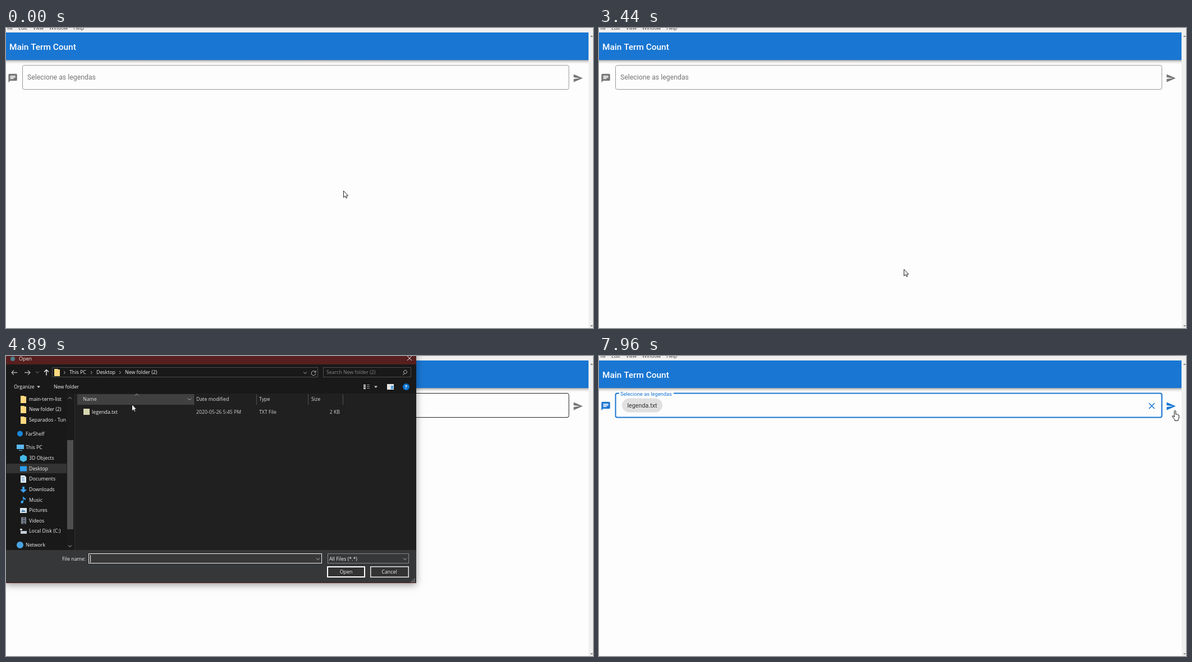
Animation of 1046x535 px, one loop 8 s. Source, as an HTML page with a canvas:

```html
<!DOCTYPE html>
<html>
<head>
<meta charset="utf-8">
<style>
html, body { margin: 0; width: 100%; height: 100%; overflow: hidden; background: #fdfdfd; }
canvas { display: block; }
</style>
</head>
<body>
<canvas id="stage" width="1046" height="535"></canvas>
<script>
const LOOP = 8000;
const stage = document.getElementById('stage').getContext('2d');
const dialog = document.createElement('canvas');
dialog.width = 732; dialog.height = 419;
const panel = dialog.getContext('2d');
let g = stage;

const UI = '"Open Sans", "Noto Sans", sans-serif';
const APP = 'Roboto, sans-serif';
const BLUE = '#1976d2';

// ---- drawing helpers
function rect(x, y, w, h, color) { g.fillStyle = color; g.fillRect(x, y, w, h); }
function frame(x, y, w, h, color, line = 1) {
  g.strokeStyle = color; g.lineWidth = line;
  g.strokeRect(x + line / 2, y + line / 2, w - line, h - line);
}
// y is the middle of the capitals
function text(str, x, y, color, size = 8.8, align = 'left', family = UI, weight = 400) {
  g.font = `${weight} ${size}px ${family}`;
  g.textAlign = align;
  g.fillStyle = color;
  g.fillText(str, x, y + size * 0.36);
}
function shape(d, x, y, color, scale = 1, rule = 'nonzero') {
  g.save(); g.translate(x, y); g.scale(scale, scale);
  g.fillStyle = color; g.fill(new Path2D(d), rule);
  g.restore();
}
function line(d, x, y, color, width = 1, fill) {
  g.save(); g.translate(x, y);
  const p = new Path2D(d);
  if (fill) { g.fillStyle = fill; g.fill(p); }
  g.strokeStyle = color; g.lineWidth = width; g.stroke(p);
  g.restore();
}
const chevron = (x, y, color = '#bbb') => line('M-3-1.5L0 1.5L3-1.5', x, y, color);
const clamp = v => Math.max(0, Math.min(1, v));

// ---- web page
const COMMENT = 'M20 2H4A2 2 0 0 0 2 4V22L6 18H20A2 2 0 0 0 22 16V4A2 2 0 0 0 20 2M6 9H18V11H6M14 14H6V12H14M18 8H6V6H18Z';
const SEND = 'M2 21L23 12L2 3V10L17 12L2 14Z';

function drawApp(t) {
  const focused = t >= 6970, hover = t >= 4120 && !focused;
  const tint = focused ? BLUE : '#757575';
  rect(0, 0, 1046, 535, '#fdfdfd');
  const shade = g.createLinearGradient(0, 57, 0, 64);
  shade.addColorStop(0, 'rgba(0,0,0,.38)');
  shade.addColorStop(0.4, 'rgba(0,0,0,.13)');
  shade.addColorStop(1, 'rgba(0,0,0,0)');
  rect(0, 57, 1038, 7, shade);
  rect(0, 8, 1038, 49, BLUE);
  rect(0, 0, 1046, 8, '#f0f0f0');
  rect(1038, 8, 8, 527, '#f0f0f0');
  shape('M0 3L2.5 0L5 3Z', 1041, 13, '#888');
  shape('M0 0L2.5 3L5 0Z', 1041, 530, '#888');
  [['File', -2], ['Edit', 22], ['View', 48], ['Window', 77], ['Help', 120]]
    .forEach(([s, x]) => text(s, x, 0, '#333', 8.8));
  text('Main Term Count', 6, 33, '#fff', 15.4, 'left', APP, 500);

  g.beginPath();
  g.roundRect(29.5, 66.5, 973.5, 43, 3);
  g.strokeStyle = focused ? BLUE : hover ? '#222' : '#989898';
  g.lineWidth = focused ? 2 : 1;
  g.stroke();
  const up = 1 - (1 - clamp((t - 6970) / 250)) ** 3;
  const rise = focused ? up : 0;
  if (focused) rect(36, 65, 97 * rise, 4, '#fdfdfd');
  text('Selecione as legendas', 38, 88 - 20.5 * rise, focused ? BLUE : '#757575', 12.3 - 3.05 * rise, 'left', APP);
  shape(COMMENT, 2.8, 80.3, tint, 0.768, 'evenodd');
  shape(SEND, 1010, 80.3, tint, 0.768);
  if (focused) {
    g.beginPath(); g.roundRect(41, 75.5, 72, 25, 12.5);
    g.fillStyle = '#e0e0e0'; g.fill();
    text('legenda.txt', 50.5, 88, '#333', 10.75, 'left', APP);
    line('M-5-5L5 5M5-5L-5 5', 985, 89, BLUE, 1.6);
  }
}

// ---- text editor
const LETTER = [
  '1|Dear Mirel,', '2|',
  '3|Thanks for your letter. I‘m glad you and the family are well. So, you‘re thinking of going on holiday in the UK.',
  '|Well I can certainly recommend one destination for you. I went one year to a place called Dunravoch in the north',
  '|west of Scotland. It‘s quite a long trip to get there as it‘s only about thirty miles from the north coast but it‘s',
  '|worth it.', '4|',
  '5|There are only a few places to stay. There are two hotels, the Fennoch and the Torlay in the centre of town, and a',
  '|campsite just outside town. We stayed at the Fennoch Hotel but I know you and your family are keen campers so you',
  '|might prefer the camping option.', '6|',
  '7|There is a lot to do but it‘s a bit dependent on the weather. There‘s a beautiful beach, a golf course, the fishing',
  '|is excellent and there are fantastic hills nearby for walking in amazing scenery. If it‘s wet there‘s a small cinema',
  '|in town but that‘s about all. Take some board games!', '8|',
  '9|The food is typical British in the hotels but some of the Scottish specialities are fantastic. If you‘re camping',
  '|though, food will be up to you!', '10|',
  '11|Anyway, I‘ve got to go out now and pick up the kids. Write again if you need any more information.', '12|',
  '13|Regards,', '14|'
].map(s => s.split('|'));

const MENU = [['File', -3], ['Edit', 24], ['Search', 50], ['View', 88], ['Encoding', 118], ['Language', 168], ['Settings', 219],
  ['Tools', 263], ['Macro', 294], ['Run', 332], ['Plugins', 358], ['Window', 400], ['?', 443]];
const TOOLS = [[4, '#8b8'], [21, '#fc5', 'f'], [39, '#58c', 'f'], [57, '#58c', 'f'], [75, '#c76'], [93, '#c76'], [111, '#79a', 'f'],
  [134, '#555', '✂'], [152, '#88a'], [170, '#b95'], [194, '#888', '↶'], [212, '#888', '↷'], [236, '#334', '∞'], [253, '#37a', 'ab'],
  [278, '#4a8', '○'], [295, '#c66', '○'], [320, '#fb5'], [337, '#fb5'], [361, '#37c', '↵'], [379, '#38d', '¶'], [398, '#24c', '≡'],
  [415, '#c85'], [433, '#e94', 'f'], [450, '#c95', 'ƒ'], [468, '#db5'], [486, '#665', '◉'], [510, '#911', '●'], [528, '#444', '■'],
  [545, '#48c', '▸'], [563, '#38d', '»'], [581, '#888', 'f']];
const TABS = [['new 1', 10], ['new 2', 64], ['new 3', 117], ['new 6', 171], ['new 9', 224], ['new 15', 277], ['new 17', 335],
  ['new 8', 394], ['new 12', 447], ['legenda.txt', 504]];

function drawEditor(t) {
  const clicked = t >= 1590;
  rect(0, 0, 1046, 535, '#f0f0f0');
  rect(0, 0, 1046, 7, '#fff');
  rect(0, 7, 1046, 20, '#f8f8f8');
  MENU.forEach(([s, x]) => text(s, x, 0, '#111', 8.6));
  text('x', 1041, 0, '#444', 8.6);

  [123, 183, 224, 266, 308, 350, 389, 499].forEach(x => rect(x, 9, 1, 14, '#ccc'));
  [361, 398].forEach(x => { rect(x - 9, 7, 18, 18, '#cce8ff'); frame(x - 9, 7, 18, 18, '#90c8f6'); });
  TOOLS.forEach(([x, color, kind]) => {
    if (x > 500 && x < 570) frame(x - 5, 11, 11, 11, '#aaa');
    if (kind === 'f') {
      rect(x - 5, 11, 11, 10, color); rect(x - 2, 16, 6, 4, '#eee');
    } else if (kind) text(kind, x, 16, color, 11, 'center', '"DejaVu Sans", sans-serif', 700);
    else {
      rect(x - 4, 10, 9, 12, '#fff'); frame(x - 4, 10, 9, 12, '#99a'); rect(x - 1, 14, 5, 5, color);
    }
  });

  rect(0, 27, 1046, 1, '#ddd');
  TABS.forEach(([name, x], i) => {
    const active = i === 9, end = active ? 562 : TABS[i + 1][1] - 14;
    rect(x - 13, active ? 29 : 31, end - x + 13, 17, active ? '#f0f0f0' : '#c0c0c0');
    frame(x - 13, 30, end - x + 13, 18, '#999');
    if (active) rect(x - 12, 29, 69, 2, '#faaa3c');
    rect(x - 11, 34, 9, 9, active ? '#4a90d0' : '#76a0c8');
    rect(x - 9, 34, 5, 3, '#e4eef6');
    rect(x - 9, 39, 5, 3, '#dde6ee');
    text(name, x, 38.5, active ? '#000' : '#808080', 8.4);
    const cx = end - 13;
    frame(cx, 34, 8, 8, active ? '#555' : '#888');
    line('M2 2L6 6M6 2L2 6', cx, 34, active ? '#444' : '#888');
  });

  rect(0, 48, 1046, 469, '#000');
  rect(0, 48, 41, 469, '#303030');
  rect(41, clicked ? 304 : 406, 1005, clicked ? 34 : 17, '#323232');
  const mono = '"Liberation Mono", "Courier New", monospace';
  LETTER.forEach(([number, row], i) => {
    const y = 57 + 17 * i;
    if (number) text(number, 27, y, '#ddd', 14.17, 'right', mono);
    [...row].forEach((c, k) => text(c, 42 + 8.5 * k, y, '#ececec', 14.17, 'left', mono));
  });
  const blink = t < 1040 || (clicked && t < 2110) || (t >= 2760 && t < 3370);
  if (blink) rect(clicked ? 484 : 42, clicked ? 304 : 406, 1, 17, '#fff');

  rect(0, 519, 1046, 1, '#aaa');
  [478, 632, 834, 919, 1011].forEach(x => rect(x, 523, 1, 12, '#ccc'));
  [['Normal text file', -5], ['length : 1,208', 482], ['lines : 14', 545], [clicked ? 'Ln : 9' : 'Ln : 14', 636],
    [clicked ? 'Col : 53' : 'Col : 1', 667], ['Sel : 0 | 0', 706], ['Generic (CR LF)', 837], ['UTF-8', 923], ['INS', 1015]]
    .forEach(([s, x]) => text(s, x, 530, '#111', 8.6));
}

// ---- file dialog
const FOLDER = 'M1 0h6l1 1h3v12h-10z', SCREEN = 'M0 2h12v9h-12z', PAGE = 'M1 0h7l3 3v10h-10z';
const PLACES = [
  ['main-term-list', 77, FOLDER, '#fcd980'], ['New folder (2)', 95, FOLDER, '#fcd980'], ['Separados - Tun', 114, FOLDER, '#fcd980'],
  ['FarShelf', 138.5, 'M6 1a5 5 0 1 1-.1 0z', '#1a86d9', 6],
  ['This PC', 163, 'M0 1h13v8h-13zM4 11h6v1h-6z', '#5bb8ee', 6],
  ['3D Objects', 182, 'M6 0l6 3v7l-6 3l-6-3v-7z', '#45b8e6'], ['Desktop', 200.5, SCREEN, '#2b9df0'],
  ['Documents', 219, PAGE, '#e4ecf2'], ['Downloads', 238, 'M4 1h4v5h4l-6 6l-6-6h4z', '#3b9ff0'],
  ['Music', 256.5, 'M5 0l5 4v3l-4-3v6a2.4 2.4 0 1 1-1-2z', '#38a4ee'], ['Pictures', 275, SCREEN, '#dde6ee'],
  ['Videos', 293.5, 'M2 0h9v12h-9z', '#77808c'], ['Local Disk (C:)', 312, 'M0 2h4v3h-4zM1 6h11v5h-11z', '#c4cdd4'],
  ['Network', 337, 'M6 0a6 6 0 1 1-.1 0z', '#4aa3e0', 6]
];

function drawDialog(t) {
  const selected = t >= 5430, closing = t >= 6760;
  const white = '#f2f2f2';
  g = panel;
  g.setTransform(1, 0, 0, 1, 1, 14);
  rect(-1, -14, 732, 419, '#202020');
  rect(-1, -14, 732, 29, closing ? '#4b2f35' : '#571f1f');
  g.beginPath(); g.arc(12, 5, 4, 0, 7); g.fillStyle = '#4f7f8c'; g.fill();
  text('Open', 23, 5, closing ? '#aaa' : white, 9);
  line('M-4-4L4 4M4-4L-4 4', 719, 4, '#eee');
  rect(-1, 15, 732, 52, '#191919');

  line('M5 0H-5M-1-4L-5 0L-1 4', 15, 29.5, '#aaa', 1.3);
  line('M-5 0H5M1-4L5 0L1 4', 38, 29.5, '#aaa', 1.3);
  chevron(56, 29, '#888');
  line('M0 5V-5M-4-1L0-5L4-1', 72, 29.5, '#eee', 1.4);
  frame(82, 20, 474, 18, '#4c4c4c');
  frame(565, 20, 157, 18, '#4c4c4c');
  shape(FOLDER, 85, 23, '#fcd980');
  [104, 152, 203].forEach(x => line('M-1-2.5L1.5 0L-1 2.5', x, 29.5, '#bbb'));
  text('This PC', 113, 29, white); text('Desktop', 161, 29, white); text('New folder (2)', 212, 29, white);
  chevron(533, 30);
  line('M3-2A4 4 0 1 0 4 1M4-4V-1H1', 548, 30, '#bbb');
  text('Search New folder (2)', 571, 29, '#858585');
  line('M-1 1L-4 4M-1 1A3 3 0 1 1 3 0A3 3 0 0 1-1 1', 711, 30, '#bbb');

  text('Organize', 14, 55, white); text('New folder', 85, 55, white);
  [58, 659].forEach(x => shape('M-3-1.5H3L0 2Z', x, 55, '#ccc'));
  [51, 54, 57].forEach(y => { rect(637, y, 4, 2, '#ddd'); rect(643, y, 5, 1, '#999'); });
  rect(679, 50, 12, 10, '#e6e6e6'); rect(686, 53, 4, 6, '#4aa0e0');
  g.beginPath(); g.arc(713, 55, 6, 0, 7); g.fillStyle = '#0b74d1'; g.fill();
  text('?', 713, 55, '#fff', 9, 'center', UI, 700);

  rect(-1, 67, 123, 279, '#191919');
  rect(122, 67, 1, 279, '#303030');
  rect(1, 192, 107, 17, '#333');
  g.save();
  g.beginPath(); g.rect(0, 67, 108, 279); g.clip();
  PLACES.forEach(([name, y, icon, color, back = 0]) => {
    shape(icon, 25 - back, y - 6, color);
    text(name, 41 - back, y, white);
  });
  [216, 219, 222].forEach(y => rect(28, y, 5, 1, '#4a90c8'));
  shape('M2 9L5 5L7 7L8 6L10 9Z', 25, 269, '#3f7fae');
  [289, 293, 297].forEach(y => rect(30, y, 4, 2, '#333b46'));
  g.restore();
  rect(108, 67, 13, 279, '#1b1b1b');
  rect(109, 150, 11, 159, '#4f4f4f');
  line('M-3 1.5L0-1.5L3 1.5', 114, 75, '#aaa');
  chevron(114, 339);

  if (t < 4960) { rect(127, 68, 207, 19, '#404040'); chevron(327, 77); }
  [334, 446, 538, 600].forEach(x => rect(x, 68, 1, 19, '#505050'));
  line('M-3 1.5L0-1.5L3 1.5', 233, 69, '#aaa');
  [['Name', 137], ['Date modified', 339], ['Type', 451], ['Size', 544]].forEach(([s, x]) => text(s, x, 77, '#ddd'));
  const hovered = t >= 5090 && t < 6400;
  if (hovered || selected) {
    const fill = closing ? '#434343' : !selected ? '#4d4d4d' : hovered ? '#777' : '#666';
    rect(135, 92, 462, 16, fill);
    if (selected && hovered) frame(135, 92, 462, 16, '#8a8a8a');
  }
  rect(138, 94, 11, 11, '#d6d6b0');
  text('legenda.txt', 153, 100, white);
  const dim = selected ? '#e2e2e2' : '#cfcfcf';
  text('2020-05-26 5:45 PM', 339, 100, dim, 8.7);
  text('TXT File', 451, 100, dim);
  text('2 KB', 595, 100, dim, 8.7, 'right');

  rect(-1, 346, 732, 59, '#363738');
  text('File name:', 142, 362, white, 8.8, 'right');
  rect(147, 352, 416, 18, '#383838');
  frame(147, 352, 416, 18, selected ? '#a5a5a5' : '#f0f0f0');
  if (closing) rect(149, 355, 47, 13, '#0078d7');
  if (selected) text('legenda.txt', 149, 362, white);
  else if (t < 5210 || t >= 5290) rect(150, 355, 1, 13, '#fff');
  chevron(556, 362);
  frame(573, 352, 145, 18, '#888');
  text('All Files (*.*)', 576, 362, white);
  chevron(711, 362);
  rect(572, 375, 68, 20, closing ? '#6b6b6b' : t >= 6560 ? '#555' : '#333');
  frame(572, 375, 68, 20, '#fff', 2);
  rect(649, 375, 69, 20, '#333');
  frame(649, 375, 69, 20, '#e8e8e8', 1.5);
  text('Open', 606, 385, white, 8.8, 'center');
  text('Cancel', 683, 385, white, 8.8, 'center');
  for (let i = 0; i < 3; i++) for (let k = 0; k <= i; k++) rect(727 - 2.5 * k, 397 + 2.5 * i, 1.3, 1.3, '#bbb');
  if (!closing) rect(-1, 404, 732, 1, '#571f1f');
  g = stage;
}

function dialogAlpha(t) {
  if (t < 4680 || t >= 6900) return 0;
  if (t >= 6760) return t < 6860 ? 0.46 : 0.12;
  return [0.35, 0.73, 0.94][Math.floor((t - 4680) / 70)] || 1;
}

function showDialog(t) {
  const alpha = dialogAlpha(t);
  if (!alpha) return;
  drawDialog(t);
  const scale = alpha === 1 ? 1 : 0.957 + 0.04 * alpha;
  g.save();
  g.globalAlpha = alpha;
  g.translate(365, 190); g.scale(scale, scale); g.translate(-365, -190);
  // the shadow falls only outside the translucent window
  g.save();
  g.beginPath(); g.rect(-50, -50, 1200, 700); g.rect(-1, -14, 732, 419); g.clip('evenodd');
  g.shadowColor = 'rgba(0,0,0,.4)'; g.shadowBlur = 12; g.shadowOffsetY = 3;
  rect(-1, -14, 732, 419, '#000');
  g.restore();
  g.drawImage(dialog, -1, -14);
  g.restore();
}

// ---- mouse: time, x, y
const TRACK = [[0, 601, 290], [1220, 601, 290], [1440, 484, 308], [1650, 484, 308], [1910, 498, 336], [2010, 498, 336],
  [2120, 514, 367], [2759, 514, 367], [2760, 543, 429], [3440, 543, 430], [3600, 543, 430], [4210, 227, 84], [4820, 227, 84],
  [5110, 216, 92], [5210, 214, 94], [5290, 214, 95], [5430, 214, 96], [5840, 231, 149], [5910, 231, 149], [6200, 262, 166],
  [6280, 290, 184], [6610, 608, 384], [6860, 608, 384], [7540, 971, 91], [7600, 971, 91], [7960, 1027, 97], [LOOP, 1027, 97]];
const ARROW = 'M.5.5V12.2L3.2 9.6L5 13.5L6.8 12.7L5.2 9H8.6Z';
const HAND = 'M4.2 12V1.7A1.3 1.3 0 0 1 6.8 1.7V7Q8 5.8 8.9 7.3Q10 6.4 10.8 8Q12.3 7.4 12.5 9.2V13Q12.3 15.3 11 16.5V18.3H5V16.3Q3 14.4.7 11.2Q.5 9.5 2 9.7Q3.2 10.3 4.2 12';

function drawMouse(t) {
  const i = TRACK.findIndex(k => k[0] > t);
  const [t0, x0, y0] = TRACK[i - 1], [t1, x1, y1] = TRACK[i];
  const f = (t - t0) / (t1 - t0);
  const x = Math.round(x0 + (x1 - x0) * f), y = Math.round(y0 + (y1 - y0) * f);
  if (t >= 500 && t < 3440) {
    line('M-3-5.5H-1L.5-4.5L2-5.5H4M.5-4.5V4.5M-3 5.5H-1L.5 4.5L2 5.5H4', x, y, '#ddd');
    return;
  }
  const overField = x > 29 && x < 1003 && y > 66 && y < 110;
  const overSend = x > 1010 && y < 100;
  if (!dialogAlpha(t) && (overField || overSend)) line(HAND, x - 6, y, '#111', 1, '#fff');
  else line(ARROW, x, y, '#222', 1, '#fff');
}

function tick(now) {
  const t = now % LOOP;
  if (t >= 500 && t < 3440) drawEditor(t);
  else { drawApp(t); showDialog(t); }
  drawMouse(t);
  requestAnimationFrame(tick);
}
requestAnimationFrame(tick);
</script>
</body>
</html>
```
